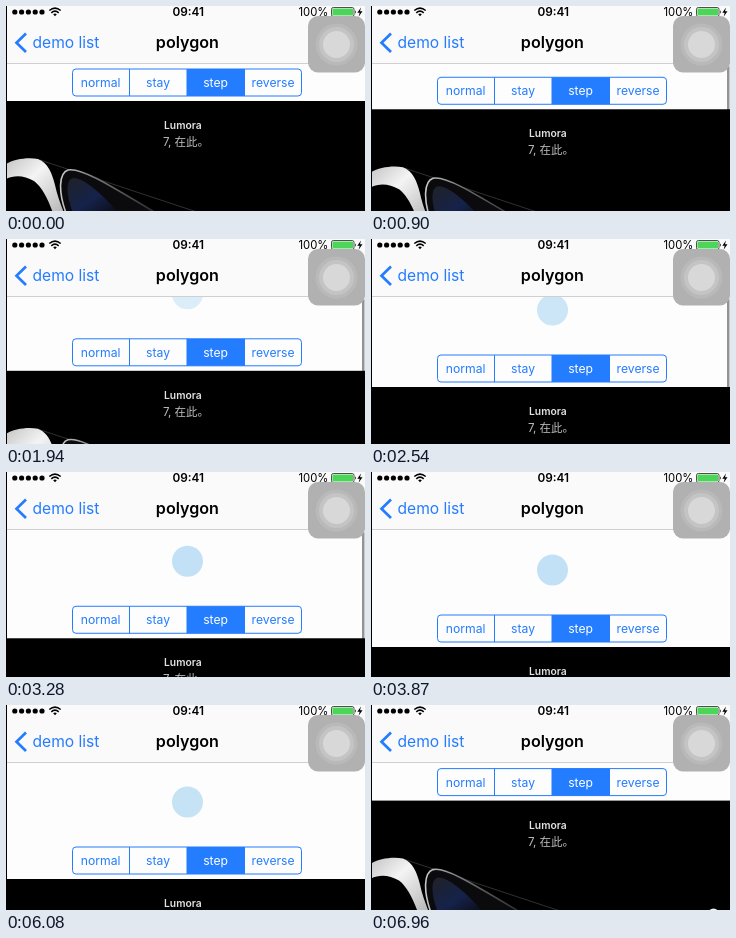
An HTML page for the animation above (7060 ms loop, 359 px wide and 205 px high).

```html
<!DOCTYPE html>
<html lang="en">
<head>
<meta charset="utf-8">
<title>polygon</title>
<style>
  html, body { margin: 0; width: 100%; height: 100%; overflow: hidden; background: #fdfdfd; }
  svg { display: block; width: 100vw; height: 100vh; }
  text { font-family: Inter, "Noto Sans CJK SC", "Noto Sans CJK", sans-serif; }
  .mid { text-anchor: middle; }
  .blue { fill: #247cff; }
  .line { fill: none; stroke: #247cff; }
</style>
</head>
<body>
<svg viewBox="0 0 359 205">
  <defs>
    <linearGradient id="rim" x1="0" y1="0" x2="1" y2="0">
      <stop offset="0" stop-color="#c8c8ca"/>
      <stop offset=".35" stop-color="#77787c"/>
      <stop offset="1" stop-color="#2a2a2c"/>
    </linearGradient>
    <linearGradient id="shine" x1="0" y1="0" x2="1" y2="1">
      <stop offset="0" stop-color="#c4c4c4"/>
      <stop offset=".4" stop-color="#f4f4f4"/>
      <stop offset="1" stop-color="#b5b5b5"/>
    </linearGradient>
    <linearGradient id="lens" x1="0" y1="0" x2="1" y2="1">
      <stop offset="0" stop-color="#202227"/>
      <stop offset=".55" stop-color="#15224a"/>
      <stop offset="1" stop-color="#0a0c14"/>
    </linearGradient>
  </defs>
  <rect width="359" height="205" fill="#fdfdfd"/>

  <circle id="loader" cx="181.5" r="15.5" fill="#b8dcf4"/>

  <g id="page">
    <g id="tabs" font-size="12.2">
      <rect x="181" y="63" width="57.5" height="27" class="blue"/>
      <rect x="66.5" y="63" width="229" height="27" rx="3.5" class="line"/>
      <path d="M123.5 63v27M181 63v27M238.5 63v27" class="line"/>
    </g>
    <g transform="translate(0 95)">
      <rect width="359" height="112" fill="#000"/>
      <text x="158" y="28" font-size="10.3" font-weight="600" fill="#e2e2e2">Lumora</text>
      <text x="157" y="45" font-size="11.5" fill="#bdbdbd">7, 在此。</text>
      <path d="M34 59L194 112" stroke="#303032"/>
      <path d="M0 63C8 58 22 56 32 58C42 62 46 72 49 84C51 94 55 104 58 112H47C42 98 36 86 28 80C18 74 8 74 0 78Z" fill="url(#shine)"/>
      <path d="M60 112C52 90 53 72 62 69C74 66 100 82 150 112Z" fill="#0b0b0d" stroke="url(#rim)" stroke-width="1.6"/>
      <path d="M67 112C59 92 60 77 68 77C77 77 96 92 112 112Z" fill="url(#lens)"/>
    </g>
  </g>
  <rect id="bar" x="356" y="60" width="2.5" height="145" rx="1.2" fill="#000" fill-opacity=".42"/>

  <rect width="359" height="57" fill="#fafafa"/>
  <path d="M0 57.5H359" stroke="#d0d0d2"/>
  <path d="M20 27.5L10.5 36.7L20 46" class="line" stroke-width="2.7"/>
  <text x="26.5" y="42" font-size="15.6" class="blue">demo list</text>
  <text x="181.4" y="42" font-size="16.1" font-weight="600" class="mid">polygon</text>

  <path d="M.5 0V205" stroke="#000"/>
  <rect id="shade" width="359" height="18" fill="#000"/>
  <g id="dots"></g>
  <g fill="none" stroke="#000" stroke-width="1.6">
    <path d="M43.3 4.5Q49 -.3 54.7 4.5M45.3 6.8Q49 3.6 52.7 6.8"/>
    <path d="M49 10.2L47.2 8.3Q49 6.9 50.8 8.3Z" fill="#000" stroke="none"/>
  </g>
  <text x="182.3" y="10" font-size="11.8" font-weight="600" class="mid">09:41</text>
  <text x="292.5" y="10" font-size="11.3">100%</text>
  <rect x="325.5" y="1.5" width="22.5" height="9" rx="1.8" fill="#fff" stroke="#222" stroke-width=".8"/>
  <rect x="326.4" y="2.4" width="20.7" height="7.2" rx="1" fill="#4cd558"/>
  <path d="M349 4.3q1.8 1.7 0 3.4z"/>
  <path d="M355 1.5L351.3 6.7H353.7L352.6 10.8L356.5 5.3H354Z"/>

  <g>
    <rect x="302" y="10" width="57" height="56.5" rx="10" fill="#b1b1b1"/>
    <circle cx="330.5" cy="38.5" r="21" fill="#b9b9b9"/>
    <circle cx="330.5" cy="38.5" r="17.5" fill="#c4c4c4"/>
    <circle cx="330.5" cy="38.5" r="13.5" fill="#d8d8d8"/>
  </g>
  <path id="arrow" d="M0 0V13.5L3.2 10.6L5.6 16L8.2 14.9L5.8 9.7H10Z" fill="#000" stroke="#fff"/>
  <circle id="tip" cx="342.5" cy="209.5" r="6" fill="#f4f4f4"/>
</svg>
<script>
const LOOP = 7060, START = 750, STEP = 147.86;
const NS = "http://www.w3.org/2000/svg";
const $ = id => document.getElementById(id);

function add(parent, tag, attrs, text = "") {
  const el = document.createElementNS(NS, tag);
  for (const key in attrs) el.setAttribute(key, attrs[key]);
  el.textContent = text;
  parent.append(el);
}

for (let i = 0; i < 5; i++) add($("dots"), "circle", { cx: 8.8 + i * 6.8, cy: 6, r: 2.6 });
["normal", "stay", "step", "reverse"].forEach((name, i) =>
  add($("tabs"), "text", {
    x: 94.6 + i * 57.5, y: 81, class: "mid", fill: i === 2 ? "#fff" : "#247cff"
  }, name));

// Linear interpolation through [time, value] points
function track(points, t) {
  if (t <= points[0][0]) return points[0][1];
  for (let i = 1; i < points.length; i++) {
    const [t0, a] = points[i - 1], [t1, b] = points[i];
    if (t <= t1) return a + (b - a) * (t - t0) / (t1 - t0);
  }
  return points[points.length - 1][1];
}

const pull = [[600, 0], [1341, 20.6], [1940, 37], [2524, 53], [3250, 71], [3700, 80],
  [3870, 80], [4170, 79], [6230, 79], [6375, 70], [6520, 43], [6670, 18], [6820, 5], [6950, .6]];
const barAlpha = [[700, 0], [900, 1], [3400, 1], [3750, 0]];
const shadeAlpha = [[4250, 0], [4600, .14], [5300, .14], [5700, 0]];
const arrowX = [[4300, 344], [4742, 337], [5200, 346]];
const arrowY = [[4300, 180], [4742, 91], [5200, 10]];

function draw(time) {
  const t = time % LOOP;
  const s = t < START ? 0 : START + Math.floor((t - START) / STEP + 1e-6) * STEP;
  const y = track(pull, s);
  $("page").setAttribute("transform", `translate(0 ${y})`);
  $("loader").setAttribute("cy", 18 + y);
  const wave = s > 3700 && s < 6300 ? .06 * Math.sin((s - 3870) / 190) : 0;
  $("loader").setAttribute("opacity", Math.min(.85, y / 75) + wave);
  $("bar").setAttribute("opacity", track(barAlpha, s));
  $("shade").setAttribute("opacity", track(shadeAlpha, s));
  $("arrow").setAttribute("transform", `translate(${track(arrowX, s)} ${track(arrowY, s)})`);
  $("arrow").setAttribute("opacity", s > 4290 && s < 5250 ? 1 : 0);
  $("tip").setAttribute("opacity", s > 6900 ? 1 : 0);
}

const begin = performance.now();
function tick() {
  draw(performance.now() - begin);
  requestAnimationFrame(tick);
}
tick();
</script>
</body>
</html>
```
